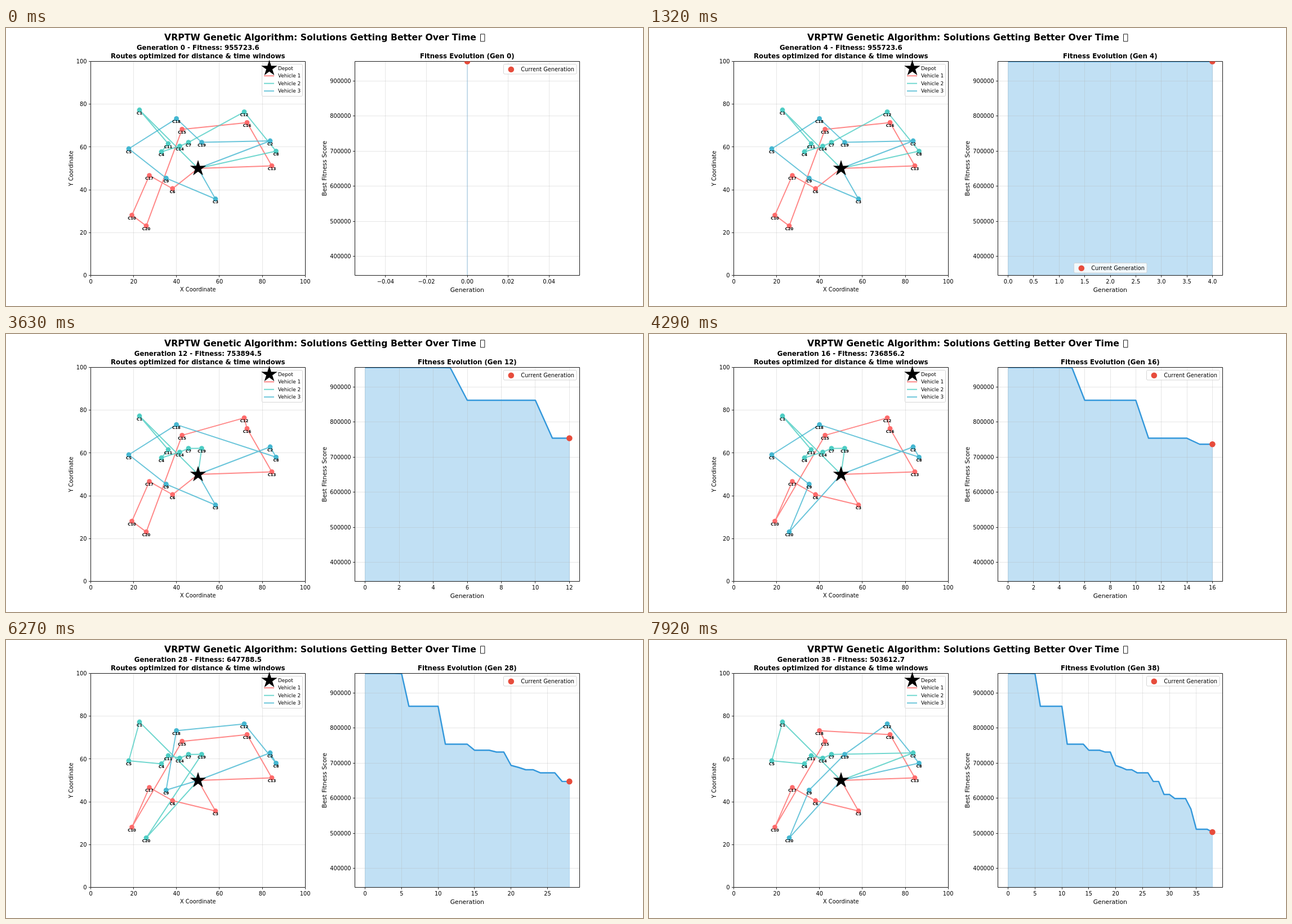
These frames come from a looping animation (1131x495 px, 8 s). An HTML page with a canvas:

```html
<!DOCTYPE html>
<html lang="en">
<head>
<meta charset="utf-8">
<style>
  html, body { margin: 0; width: 100%; height: 100%; overflow: hidden; background: #fff; }
  canvas { display: block; }
</style>
</head>
<body>
<canvas id="stage" width="1131" height="495"></canvas>
<script>
const ctx = document.getElementById('stage').getContext('2d');
const PT = 0.982; // pixels per typographic point
const LOOP = 8000, STEP = 330, LAST = 24;
const TOP = 59.5, BOTTOM = 440.5;
const MAP = { x: 150.5, w: 380.7 };
const CHART = { x: 619.5, w: 399 };
const COLORS = ['#ff6b6b', '#4ecdc4', '#45b7d1'];
const DEPOT = [341, 250];

// Pixel positions of customers C1 to C20.
const CUSTOMERS = [
  [237, 146], [469, 201], [372, 304.5], [276, 220.5], [218, 215],
  [295.7, 286], [324, 203.7], [479.5, 219.3], [284.3, 267.3], [223.5, 333.3],
  [288, 206], [423, 149.4], [472, 245.4], [308.5, 210.3], [312.6, 180.4],
  [428, 168.4], [254.5, 262.7], [302.6, 161.4], [347.5, 203.6], [249, 352.4]
];

// Per vehicle: first generation in which a route is used, then its stops.
const ROUTES = [
  [
    [0, '13 16 15 20 10 17 6'],
    [11, '13 16 12 15 20 10 17 6'],
    [15, '13 16 12 15 10 17 6 3'],
    [18, '13 16 15 10 17 6 3'],
    [34, '13 16 18 15 10 17 6 3']
  ],
  [
    [0, '1 11 4 14 7 12 8'],
    [6, '1 11 4 14 7 19 12'],
    [11, '1 11 4 14 7 19'],
    [20, '1 11 4 14 7 19 20'],
    [27, '1 5 4 11 14 7 19 20'],
    [29, '1 5 4 11 14 7 19'],
    [35, '1 5 4 11 14 7 2']
  ],
  [
    [0, '3 9 5 18 19 2'],
    [6, '2 8 3 9 5 18'],
    [11, '2 8 18 5 9 3'],
    [15, '2 8 18 5 9 20'],
    [18, '2 8 12 18 5 9 20'],
    [20, '2 8 12 18 5 9'],
    [27, '2 8 12 18 9'],
    [29, '2 8 12 18 9 20'],
    [34, '2 8 12 9 20'],
    [35, '8 12 19 20 9'],
    [38, '8 12 19 9 20']
  ]
];

// Best fitness, held until the next listed generation.
const FITNESS = [
  [0, 955723.6], [5, 954863.2], [6, 862031.7], [11, 753894.5], [15, 736856.2],
  [18, 731742.8], [20, 693576.4], [21, 688041.3], [22, 681286.9], [24, 672548.1],
  [27, 647788.5], [29, 610842.7], [31, 599127.4], [34, 569218.6], [35, 511694.3],
  [38, 503612.7]
];

const held = (keys, gen) => keys.filter(key => key[0] <= gen).pop()[1];
const fitnessY = value => TOP + (FITNESS[0][1] - value) * 6.2477e-4;

function text(str, x, y, size, align = 'center', weight = 'normal') {
  ctx.font = `${weight} ${size * PT}px "DejaVu Sans", sans-serif`;
  ctx.textAlign = align;
  ctx.fillStyle = '#000';
  ctx.fillText(str, x, y);
}

function sideText(str, x, size) {
  ctx.save();
  ctx.translate(x, 250);
  ctx.rotate(-Math.PI / 2);
  text(str, 0, 0, size);
  ctx.restore();
}

function polyline(points, color, width, alpha = 1) {
  ctx.globalAlpha = alpha;
  ctx.strokeStyle = color;
  ctx.lineWidth = width;
  ctx.lineJoin = 'round';
  ctx.beginPath();
  points.forEach(([x, y]) => ctx.lineTo(x, y));
  ctx.stroke();
  ctx.globalAlpha = 1;
}

function dot([x, y], radius, color) {
  ctx.fillStyle = color;
  ctx.beginPath();
  ctx.arc(x, y, radius, 0, 2 * Math.PI);
  ctx.fill();
}

function star([x, y]) {
  ctx.fillStyle = '#000';
  ctx.beginPath();
  for (let i = 0; i < 10; i++) {
    const r = i % 2 ? 5.7 : 15, a = i * Math.PI / 5;
    ctx.lineTo(x + r * Math.sin(a), y - r * Math.cos(a));
  }
  ctx.fill();
}

function legendBox(x, y, w, h) {
  ctx.globalAlpha = 0.8;
  ctx.beginPath();
  ctx.roundRect(x, y, w, h, 2);
  ctx.fillStyle = '#fff';
  ctx.fill();
  ctx.strokeStyle = '#ccc';
  ctx.lineWidth = 1;
  ctx.stroke();
  ctx.globalAlpha = 1;
}

const snap = v => Math.floor(v) + 0.5;

function grid(area, xTicks, yTicks) {
  for (const [x] of xTicks) polyline([[snap(x), TOP], [snap(x), BOTTOM]], '#b0b0b0', 0.8, 0.4);
  for (const [y] of yTicks) polyline([[area.x, snap(y)], [area.x + area.w, snap(y)]], '#b0b0b0', 0.8, 0.4);
}

function frame(area, xTicks, yTicks) {
  ctx.strokeStyle = '#000';
  ctx.lineWidth = 0.9;
  ctx.strokeRect(area.x, TOP, snap(area.x + area.w) - area.x, BOTTOM - TOP);
  for (const [x, label] of xTicks) {
    polyline([[snap(x), BOTTOM], [snap(x), BOTTOM + 3.5]], '#000', 0.8);
    text(label, x, 454.9, 10);
  }
  for (const [y, label] of yTicks) {
    polyline([[area.x - 3.5, snap(y)], [area.x, snap(y)]], '#000', 0.8);
    text(label, area.x - 6.9, y + 3.7, 10, 'right');
  }
}

function drawMap(gen) {
  const values = [0, 20, 40, 60, 80, 100];
  const xTicks = values.map(v => [MAP.x + v * MAP.w / 100, v]);
  const yTicks = values.map(v => [BOTTOM - v * (BOTTOM - TOP) / 100, v]);
  grid(MAP, xTicks, yTicks);

  const stops = ROUTES.map(keys =>
    held(keys, gen).split(' ').map(id => CUSTOMERS[id - 1]));
  stops.forEach((route, i) => polyline([DEPOT, ...route, DEPOT], COLORS[i], 2 * PT, 0.8));
  stops.forEach((route, i) => route.forEach(p => dot(p, 4.4, COLORS[i])));
  frame(MAP, xTicks, yTicks);
  CUSTOMERS.forEach(([x, y], i) => text('C' + (i + 1), x, y + 7.6, 7, 'center', 'bold'));
  star(DEPOT);

  legendBox(454.5, 64.5, 72, 57);
  star([467.5, 71.8]);
  ['Depot', 'Vehicle 1', 'Vehicle 2', 'Vehicle 3'].forEach((name, i) => {
    const y = 71.7 + i * 13.5;
    if (i) polyline([[458, y], [476, y]], COLORS[i - 1], 2 * PT, 0.8);
    text(name, 483, y + 3.2, 9, 'left');
  });

  text(`Generation ${gen} - Fitness: ${held(FITNESS, gen).toFixed(1)}`, 340.8, 39.2, 12, 'center', 'bold');
  text('Routes optimized for distance & time windows', 340.8, 53.7, 12, 'center', 'bold');
  text('X Coordinate', 340.8, 469.2, 10);
  sideText('Y Coordinate', 118.5, 10);
}

// At most nine intervals, using round step sizes.
function niceTicks(lo, hi) {
  const raw = (hi - lo) / 9;
  const unit = 10 ** Math.floor(Math.log10(raw));
  const step = unit * [1, 2, 2.5, 5, 10].find(m => m * unit >= raw);
  let digits = 0;
  while (Math.abs(step * 10 ** digits - Math.round(step * 10 ** digits)) > 1e-6) digits++;
  const ticks = [];
  for (let k = Math.ceil(lo / step); k * step <= hi; k++) {
    ticks.push([k * step, (k * step).toFixed(digits).replace('-', '\u2212')]);
  }
  return ticks;
}

function drawChart(gen) {
  const pad = gen ? gen * 0.05 : 0.055;
  const genX = v => CHART.x + CHART.w * (v + pad) / (gen + 2 * pad);
  const xTicks = niceTicks(-pad, gen + pad).map(([v, label]) => [genX(v), label]);
  const yTicks = [4, 5, 6, 7, 8, 9].map(n => [fitnessY(n * 1e5), n * 1e5]);
  const curve = Array.from({ length: gen + 1 }, (_, g) => [genX(g), fitnessY(held(FITNESS, g))]);
  const now = curve[gen];

  ctx.save();
  ctx.beginPath();
  ctx.rect(CHART.x, TOP, CHART.w, BOTTOM - TOP);
  ctx.clip();
  ctx.globalAlpha = 0.3;
  ctx.fillStyle = ctx.strokeStyle = '#3498db';
  ctx.lineWidth = PT;
  ctx.beginPath();
  [[genX(0), 660], ...curve, [now[0], 660]].forEach(([x, y]) => ctx.lineTo(x, y));
  ctx.closePath();
  ctx.fill();
  ctx.stroke();
  ctx.globalAlpha = 1;
  grid(CHART, xTicks, yTicks);
  polyline(curve, '#3498db', 2.5 * PT);
  ctx.restore();

  frame(CHART, xTicks, yTicks);
  ctx.save();
  ctx.beginPath();
  ctx.rect(CHART.x, TOP, CHART.w, BOTTOM - TOP);
  ctx.clip();
  dot(now, 5.3, '#e74c3c');
  ctx.restore();

  // The legend sits at the bottom while the curve occupies the top corner.
  const [x, y] = gen >= 1 && gen <= 7 ? [754.5, 418.5] : [883.5, 64.5];
  legendBox(x, y, 129.5, 17.5);
  dot([x + 13.3, y + 9.2], 5.3, '#e74c3c');
  text('Current Generation', x + 30.7, y + 12.3, 10, 'left');

  text(`Fitness Evolution (Gen ${gen})`, 818.8, 53.7, 12, 'center', 'bold');
  text('Generation', 818.8, 470, 11);
  sideText('Best Fitness Score', 568.8, 11);
}

function draw() {
  const index = Math.min(LAST, Math.floor(performance.now() % LOOP / STEP));
  const gen = index <= 10 ? index : 2 * index - 10;
  ctx.fillStyle = '#fff';
  ctx.fillRect(0, 0, 1131, 495);
  text('VRPTW Genetic Algorithm: Solutions Getting Better Over Time', 281, 21.6, 16, 'left', 'bold');
  ctx.strokeStyle = '#000';
  ctx.lineWidth = 0.9;
  ctx.strokeRect(842.5, 10.9, 7.4, 13);
  drawMap(gen);
  drawChart(gen);
  requestAnimationFrame(draw);
}
draw();
</script>
</body>
</html>
```
